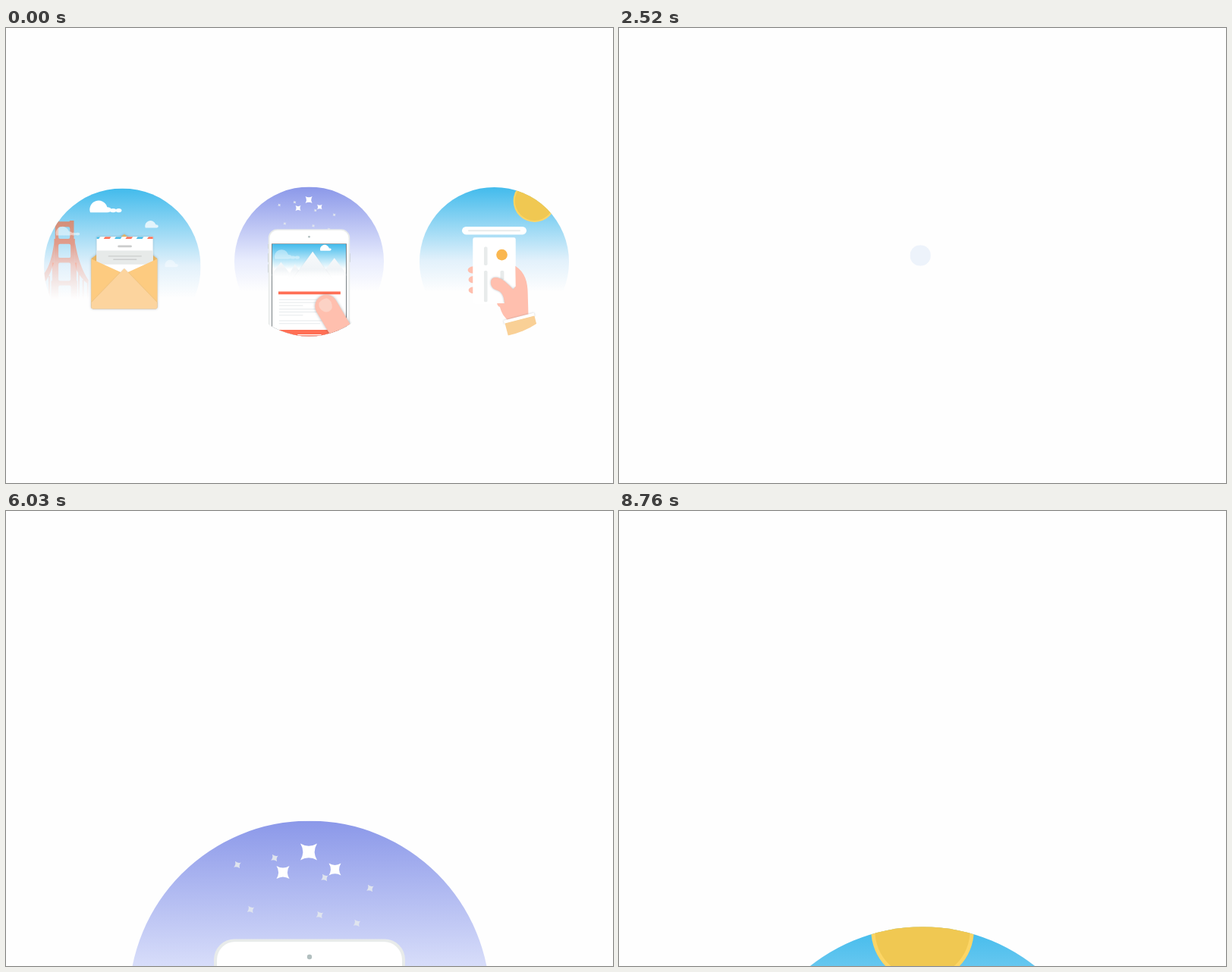
Animation of 800 by 600 pixels, one loop 8.79 s. Source, as an HTML page with a canvas:

```html
<!DOCTYPE html>
<html lang="en">
<head>
<meta charset="utf-8">
<title>Three badges</title>
<style>
html, body { margin: 0; width: 100%; height: 100%; overflow: hidden; background: #fefefe; }
canvas { display: block; }
</style>
</head>
<body>
<canvas width="800" height="600"></canvas>
<script>
const g = document.querySelector('canvas').getContext('2d');
const LOOP = 8790, R = 238;
const PAPER = '#fefefe', RED = '#ff6f55', SKIN = '#ffbfae', GREY = '#e8ebeb';
const BLUE = ['#42bbec', '#e2f1fb'], VIOLET = ['#8b98e9', '#e8ecfd'];

const clamp = x => Math.max(0, Math.min(1, x));
const ramp = (t, a, b) => clamp((t - a) / (b - a));
const smooth = x => x * x * (3 - 2 * x);
const outCubic = x => 1 - (1 - x) ** 3;
const backIn = (x, s) => (s + 1) * x ** 3 - s * x * x;
const backOut = (x, s) => 1 - backIn(1 - x, s);

function layer(draw) { g.save(); draw(); g.restore(); }
function rect(color, x, y, w, h, r = 0) {
  g.fillStyle = color;
  g.beginPath();
  g.roundRect(x, y, w, h, r);
  g.fill();
}
function circle(color, x, y, r) {
  g.fillStyle = color;
  g.beginPath();
  g.arc(x, y, r, 0, 7);
  g.fill();
}
function shape(color, d) {
  g.fillStyle = color;
  g.fill(new Path2D(d));
}
// Canvas shadows ignore the transform, so scale the blur by hand.
function shadow(blur, alpha) {
  const { a, b } = g.getTransform();
  g.shadowBlur = blur * Math.hypot(a, b);
  g.shadowColor = `rgba(60,70,80,${alpha})`;
}
function vertical(y0, y1, ...stops) {
  const paint = g.createLinearGradient(0, y0, 0, y1);
  for (const [at, color] of stops) paint.addColorStop(at, color);
  return paint;
}
function zoom(k, x, y) {
  g.translate(x, y);
  g.scale(k, k);
  g.translate(-x, -y);
}

// Round badge; content is drawn in stage coordinates around (400, 300).
function badge(x, y, k, sky, alpha, pale, draw) {
  layer(() => {
    g.translate(x, y);
    g.beginPath();
    g.rect(-R, -R, 2 * R, 2 * R);
    g.clip();
    g.scale(k, k);
    g.beginPath();
    g.arc(0, 0, R, 0, 7);
    g.clip();
    g.globalAlpha = pale;
    rect('#edf3fb', -R, -R, 2 * R, 2 * R);
    g.globalAlpha = alpha;
    rect(vertical(-R, 95, [0, sky[0]], [.7, sky[1]], [1, PAPER]), -R, -R, 2 * R, 2 * R);
    g.translate(-400, -300);
    draw();
  });
}

function cloud(x, y, k, alpha, bumps) {
  layer(() => {
    g.translate(x, y);
    g.scale(k, k);
    g.globalAlpha *= alpha;
    g.beginPath();
    g.arc(27, 27, 27, Math.PI - .34, .34);
    g.closePath();
    for (const [cx, cy, rx, ry] of [[53, 28, 13, 8], [71, 30, 10, 6], [88, 30, 9, 6]].slice(0, bumps)) {
      g.moveTo(cx + rx, cy);
      g.ellipse(cx, cy, rx, ry, 0, 0, 7);
    }
    g.fillStyle = '#fff';
    g.fill();
  });
}

function bridge() {
  g.fillStyle = vertical(160, 400, [0, '#ec7850'], [.3, 'rgba(244,128,96,.95)'],
    [.55, 'rgba(252,160,135,.6)'], [1, 'rgba(255,190,170,0)']);
  const tower = new Path2D('M205 160H215L217 163H248L250 160H262V215H205Z');
  for (const [x, y, w, h] of [[202, 215, 63, 73], [196, 288, 74, 55], [193, 343, 79, 67]])
    tower.rect(x, y, w, h);
  for (const [x, y, w, h] of [[215, 179, 35, 36], [215, 231, 37, 42], [215, 288, 37, 55], [215, 357, 38, 60]])
    tower.roundRect(x, y, w, h, 5);
  g.fill(tower, 'evenodd');
  const cables = new Path2D('M202 225Q194 290 172 320V350Q188 328 196 302L202 288Z' +
    'M265 225Q278 300 306 340V354Q282 334 270 310L265 288Z');
  for (const [x, y] of [[172, 350], [185, 328], [275, 318], [288, 340], [302, 350]])
    cables.rect(x, y, 4, 400 - y);
  g.fill(cables);
}

function letter() {
  layer(() => {
    shadow(6, .3);
    rect('#fff', 322, 186, 171, 140, 2);
  });
  layer(() => {
    g.beginPath();
    g.rect(322, 186, 171, 7);
    g.clip();
    for (let i = 0; i < 6; i++) {
      const x = 315 + 33 * i;
      shape(i % 2 ? RED : '#46bce8', `M${x} 186h18l-5 7h-18z`);
    }
  });
  rect('#cbcccc', 386, 212, 43, 6, 3);
  rect('#e7eae9', 322, 228, 171, 42);
  rect('#cbcecd', 357, 243.5, 102, 3, 1.5);
  rect('#cbcecd', 372, 253.5, 72, 3, 1.5);
}

function envelope(rise) {
  layer(() => {
    shadow(8, .35);
    shape('#e9b867', 'M306 252L402 181Q406 176 410 181L506 252V401Q506 405 502 405H310Q306 405 306 401Z');
  });
  layer(() => {
    g.translate(0, rise);
    letter();
  });
  shape('#fdcb80', 'M306 253L400 296L406 300L412 296L506 253V390H306Z');
  layer(() => {
    shadow(3, .2);
    shape('#fcd49e', 'M306 386L402 286Q406 279 410 286L506 386V401Q506 405 502 405H310Q306 405 306 401Z');
  });
}

function mail({ drift, bridgeX, bridgeY, bridgeAlpha, mailY, mailAlpha, rise }) {
  layer(() => {
    g.globalAlpha *= bridgeAlpha;
    g.translate(bridgeX, bridgeY);
    bridge();
  });
  cloud(262 + 39 * drift, 99, 1, 1, 3);
  cloud(337 + 132 * drift, 160, .61, .75, 1);
  cloud(128 + 70 * drift, 178, .75, .5, 3);
  cloud(440 + 89 * drift, 279, .61, .4, 1);
  g.globalAlpha *= mailAlpha;
  g.translate(0, mailY);
  envelope(rise);
}

function star(x, y, r, color, turn) {
  layer(() => {
    g.translate(x, y);
    g.rotate(turn);
    g.scale(r, r);
    shape(color, 'M-1-1Q0-.4 1-1Q.4 0 1 1Q0 .4-1 1Q-.4 0-1-1Z');
  });
}

function page() {
  rect('#fff', 286, 264, 228, 300);
  rect(vertical(264, 342, [0, '#42bbec'], [1, '#fff']), 286, 264, 228, 78);
  cloud(293, 281, .8, .4, 3);
  const rock = vertical(285, 372, [0, '#f8fafb'], [.65, '#f0f4f7'], [1, '#fff']);
  shape(rock, 'M313 320L346 362H281Z');
  shape(rock, 'M356 326L386 372H330Z');
  shape(rock, 'M478 307L520 362H436Z');
  layer(() => {
    shadow(3, .12);
    shape(rock, 'M411 287L472 372H349Z');
  });
  rect(vertical(345, 374, [0, 'rgba(255,255,255,0)'], [1, '#fff']), 286, 345, 228, 32);
  cloud(434, 266, .52, 1, 1);
  rect(RED, 305, 410.5, 192, 9);
  [436, 444.5, 454, 465, 474, 484, 501, 510].forEach((y, i) =>
    rect('#e6eaec', 307, y - 1.2, [172, 127, 74][i % 3], 2.4));
  rect(RED, 305, 529, 192, 32);
  rect('#fff', 364, 543, 74, 3, 1.5);
}

function phone(reveal) {
  for (const [x, y, h] of [[272.5, 264, 14], [272.5, 293, 27], [272.5, 326, 26], [524.5, 293, 27]])
    rect('#c5cdd0', x, y, 3, h);
  rect('#e8ebea', 274, 218, 252, 400, 27);
  rect('#fff', 278, 221.5, 244, 400, 24);
  circle('#b2bfbf', 400, 241.5, 3.2);
  rect('#4d5458', 284, 262.8, 232, 340);
  rect('#c6cdd0', 285.5, 264.3, 229, 340);
  layer(() => {
    g.beginPath();
    g.rect(286, 412 - 148 * reveal, 228, 296 * reveal);
    g.clip();
    page();
  });
}

function thumb(x, away) {
  layer(() => {
    g.translate(421 + x, 368);
    g.rotate(-.535);
    g.translate(0, away);
    layer(() => {
      shadow(9, .4);
      rect(SKIN, -36, -36, 72, 360, 36);
    });
    shape('#fcd2c5', 'M-14-21Q0-27 14-21Q20-15 20-4Q17 18 0 19Q-18 17-21-4Q-21-16-14-21Z');
  });
}

function tablet({ zoomed, phoneY, stars, reveal, thumbX, away }) {
  layer(() => {
    zoom(stars, 400, 304);
    star(399, 103, 11, '#fff', 0);
    star(365, 130, 8.5, '#fff', 0);
    star(433.5, 126, 8, '#fff', 0);
    for (const [x, y] of [[305, 120], [354, 111], [420, 137], [480, 151], [322.5, 179], [413.5, 186], [462.5, 197]])
      star(x, y, 4, '#dfe4ee', .2);
  });
  layer(() => {
    g.translate(0, phoneY);
    zoom(zoomed, 400, 554);
    phone(reveal);
  });
  if (away < 260) thumb(thumbX, away);
}

const PUSH = 1.012;
function payment({ angle, slotY, handY, slot }) {
  zoom(1 / PUSH, 400, 300);
  const x = 400 + 236 * Math.sin(angle), y = 300 - 236 * Math.cos(angle);
  circle('#fcd565', x, y, 68.5);
  circle('#f0c852', x, y, 63.5);

  layer(() => {
    zoom(slot, 400, 217 + slotY);
    rect('#fff', 294, 204 + slotY, 212, 26, 13);
    rect(GREY, 314, 214.5 + slotY, 172, 5, 2.5);
  });

  layer(() => {
    g.beginPath();
    g.rect(0, 217 + slotY, 800, 600);
    g.clip();
    g.translate(0, handY);
    shape(SKIN, 'M333 342C309 344 309 364 333 365ZM333 373C312 374 312 396 333 396ZM333 408C312 409 312 428 333 430Z');
    rect('#fff', 331, 249, 138, 213, 6);
    rect(GREY, 367, 279, 11, 60, 4);
    rect(GREY, 367, 356, 11, 101, 4);
    rect(GREY, 419.5, 356, 12, 30, 4);
    circle('#fab750', 424.5, 305, 18);
    layer(() => {
      g.beginPath();
      g.rect(331, 249, 138, 213);
      g.clip();
      shadow(7, .45);
      shape(SKIN, 'M389 393C390 380 399 377 410 379C428 384 440 396 461 417L469 407V461H433C433 440 425 424 410 419C396 416 389 406 389 393Z');
    });
    shape(SKIN, 'M468 341C500 362 508 395 508 430L510 500L446 518C425 500 422 485 418 473Q410 470 409 461L433 461' +
      'C433 440 425 424 410 419C396 416 389 406 389 393C390 380 399 377 410 379C428 384 440 396 461 417L469 407Z');
    g.translate(430, 517);
    g.rotate(-.253);
    layer(() => {
      shadow(6, .3);
      rect('#fff', 0, 0, 101, 11);
    });
    rect('#f9d096', 2, 10, 98, 46);
  });
}

function overview() {
  badge(153.3, 314.8, .434, BLUE, 1, 0, () =>
    mail({ drift: 1, bridgeX: -9, bridgeY: 0, bridgeAlpha: .75, mailY: 23, mailAlpha: 1, rise: 0 }));
  badge(399.5, 308, .414, VIOLET, 1, 0, () =>
    tablet({ zoomed: 1.03, phoneY: -11, stars: 1, reveal: 1, thumbX: -10, away: 86 }));
  badge(643.5, 308.5, .414, BLUE, 1, 0, () =>
    payment({ angle: .583, slotY: -18, handY: -28, slot: .98 }));
}

const scenes = [
  { start: 110, fall: 1930, sky: BLUE, peak: 2, draw: t => mail({
    drift: (t - 1530) / 1500,
    bridgeX: 0,
    bridgeY: 160 * (1 - outCubic(ramp(t, 450, 1150))),
    bridgeAlpha: 1,
    mailY: 87 * (1 - backOut(ramp(t, 900, 1400), 1)),
    mailAlpha: ramp(t, 880, 1020),
    rise: 75 * (1 - outCubic(ramp(t, 1130, 1500)))
  }) },
  { start: 2498, fall: 5530, sky: VIOLET, peak: 1, draw: t => {
    const zoomed = 1 + .103 * (1 - smooth(ramp(t, 3420, 4400)));
    tablet({
      zoomed,
      phoneY: 330 * (1 - outCubic(ramp(t, 2720, 3330))),
      stars: zoomed * outCubic(ramp(t, 2600, 3200)),
      reveal: smooth(ramp(t, 3180, 3700)),
      thumbX: 0,
      away: 300 * (1 - backOut(ramp(t, 4470, 5010), 1.6))
    });
  } },
  { start: 6084, fall: 8220, sky: BLUE, peak: 2, draw: t => payment({
    angle: -.314 * ((8220 - Math.min(t, 8220)) / 1200) ** 2,
    slotY: 0,
    handY: 300 * (1 - outCubic(ramp(t, 6400, 7000))) - 60 * smooth(ramp(t, 7150, 7700)),
    slot: outCubic(ramp(t, 6250, 6750))
  }) }
];

function render(t) {
  rect(PAPER, 0, 0, 800, 600);
  if (t < 30) return overview();
  for (const { start, fall, sky, peak, draw } of scenes) {
    if (t < start || t >= fall + 554) continue;
    const age = t - start;
    const k = Math.min(peak, backOut(clamp(age / 1450), .7));
    const drop = 538 * backIn(ramp(t, fall, fall + 554), 1.22);
    badge(400 - 3 * Math.max(0, 1 - k), 300 + drop, k, sky,
      ramp(age, 60, 560), 1 - ramp(age, 300, 750), () => draw(t));
  }
}

const began = performance.now();
function tick() {
  render((performance.now() - began) % LOOP);
  requestAnimationFrame(tick);
}
tick();
</script>
</body>
</html>
```
